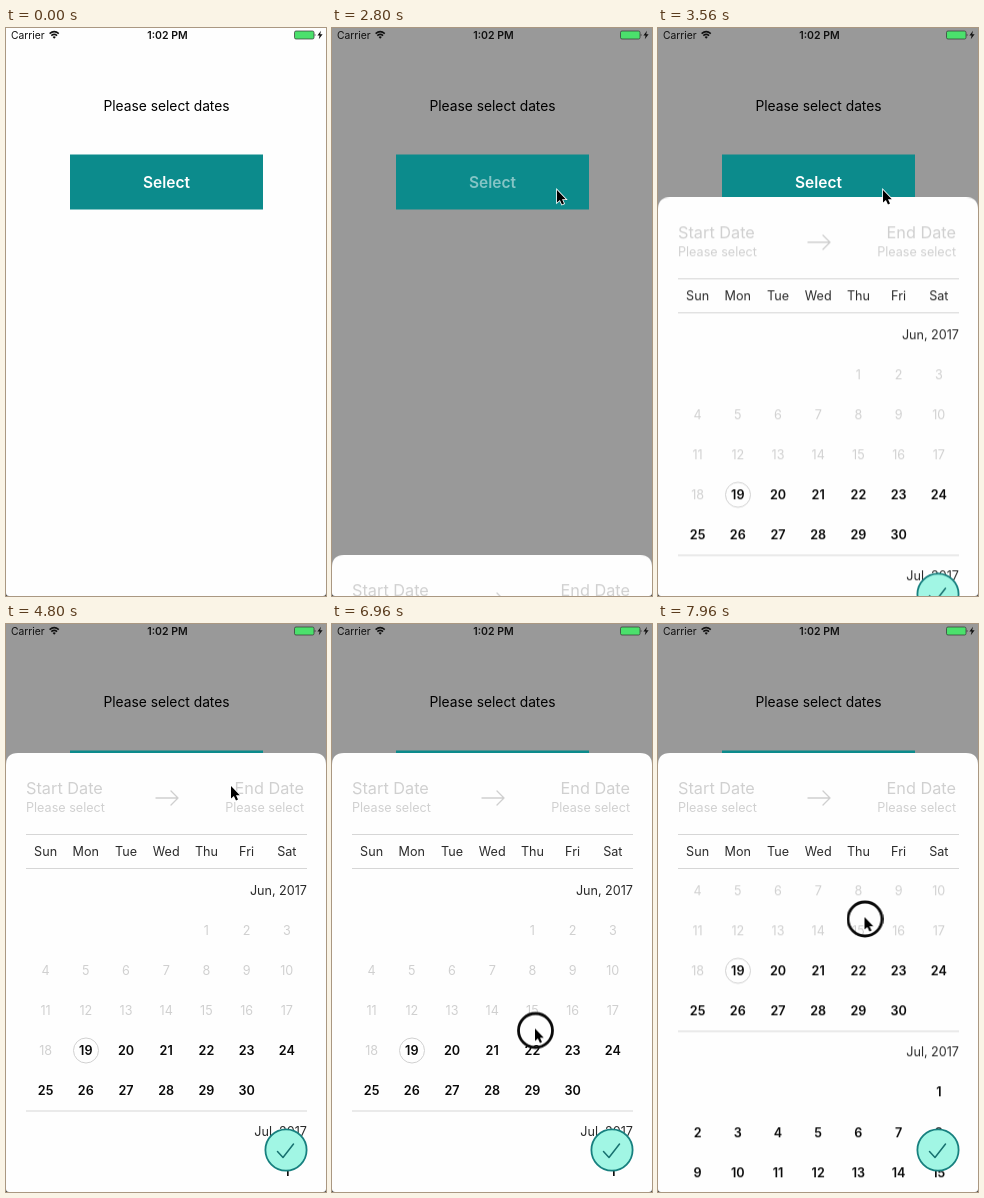
Recreate the animation shown at these times as an HTML page. Size 320 px wide and 568 px high, loop 8000 ms.

```html
<!DOCTYPE html>
<html lang="en">
<head>
<meta charset="utf-8">
<title>Date picker</title>
<style>
html, body { margin: 0; width: 100%; height: 100%; overflow: hidden; background: #fefefe; }
svg { display: block; width: 320px; height: 568px; font-family: Inter, Roboto, sans-serif; }
.end { text-anchor: end; }
.mid { text-anchor: middle; }
.semi { font-weight: 600; }
.pale { fill: #d0d0d0; }
.title { font-size: 16.3px; }
.hint { font-size: 12.6px; }
.cal { font-size: 12.6px; fill: #2b2b2b; }
.day { font-size: 12.6px; font-weight: 600; fill: #0a0a0a; }
.past { font-weight: 400; fill: #d0d0d0; }
.rule { stroke: #d6d6d6; }
.line { fill: none; stroke-linecap: round; stroke-linejoin: round; }

#dim, #label, #sheet, #scroll, #cursor, #ring { animation: 8s linear infinite; }
#dim { animation-name: dim; }
#label { animation-name: label; }
#sheet { animation-name: sheet; }
#scroll { animation-name: scroll; }
#cursor { animation-name: cursor; }
#ring { animation-name: ring; }

@keyframes dim {
  0%, 29% { opacity: 0; }
  34.5%, 100% { opacity: .4; }
}
@keyframes label {
  0%, 28% { opacity: 1; }
  29%, 37% { opacity: .5; }
  39%, 100% { opacity: 1; }
}
@keyframes sheet {
  0% { transform: translateY(439px); }
  31.49% { transform: translateY(439px); animation-timing-function: ease-in-out; }
  48.01%, 100% { transform: translateY(0); }
}
@keyframes scroll {
  0% { transform: translateY(0); }
  91% { transform: translateY(0); animation-timing-function: cubic-bezier(.4, 0, .8, .8); }
  99.5%, 100% { transform: translateY(-79.7px); }
}
@keyframes cursor {
  0%, .5% { transform: translate(324px, 288px); animation-timing-function: ease-out; }
  7.5% { transform: translate(245px, 173px); }
  15.5% { transform: translate(245px, 173px); animation-timing-function: ease-in-out; }
  21.5% { transform: translate(225px, 162px); }
  68.5% { transform: translate(225px, 162px); animation-timing-function: ease-in; }
  74% { transform: translate(254px, 255px); }
  79% { transform: translate(226px, 355px); animation-timing-function: ease-out; }
  86%, 89.5% { transform: translate(203px, 404.5px); animation-timing-function: cubic-bezier(.4, 0, .8, .8); }
  99.5%, 100% { transform: translate(206.5px, 293px); }
}
@keyframes ring {
  0%, 27.99% { opacity: 0; }
  28%, 29.99% { opacity: 1; }
  30%, 86.49% { opacity: 0; }
  86.5%, 100% { opacity: 1; }
}
</style>
</head>
<body>
<svg viewBox="0 0 320 568">
  <defs>
    <clipPath id="view"><rect y="245" width="320" height="323"/></clipPath>
  </defs>
  <rect width="320" height="568" fill="#fefefe"/>
  <rect id="dim" width="320" height="568"/>

  <g fill="#111">
    <text x="5" y="10.8" font-size="10.3">Carrier</text>
    <text x="161.5" y="10.8" font-size="10.5" class="mid semi">1:02 PM</text>
    <g class="line" stroke="#111" stroke-width="1.5" style="stroke-linecap: butt">
      <path d="M43.6 5.6Q48.2 1.6 52.8 5.6M45.3 7.6Q48.2 5.2 51.1 7.6"/>
    </g>
    <path d="M46.6 8.9Q48.2 7.8 49.8 8.9L48.2 10.7Z"/>
    <rect x="288.5" y="3" width="19.5" height="8" rx="1.5" fill="#4be06c" stroke="#333" stroke-width=".7"/>
    <path d="M308.8 5.5Q310.2 7 308.8 8.5Z"/>
    <path d="M315 2.8L311.4 7.5H313.6L312.8 11.2L316.6 6.2H314.2Z"/>
  </g>

  <text x="160.5" y="83.3" font-size="13.8" class="mid">Please select dates</text>
  <rect x="64" y="126.5" width="193" height="55" fill="#0c8b8c"/>
  <text id="label" x="160.5" y="159.6" font-size="15.5" fill="#fefefe" class="mid semi">Select</text>

  <g id="sheet">
    <path d="M0 568V141Q0 129 12 129H308Q320 129 320 141V568Z" fill="#fefefe"/>
    <g class="pale">
      <text x="20" y="170" class="title">Start Date</text>
      <text x="20" y="188" class="hint">Please select</text>
      <text x="298" y="170" class="title end">End Date</text>
      <text x="298" y="188" class="hint end">Please select</text>
    </g>
    <path d="M150 174H172M165 167L172 174L165 181" class="line" stroke="#cfcfcf" stroke-width="1.3"/>
    <path d="M20 210.5H301M20 244.5H301" class="rule"/>
    <g id="week"></g>
    <g clip-path="url(#view)">
      <g id="scroll">
        <text x="301" y="270.5" class="cal end">Jun, 2017</text>
        <circle cx="80" cy="426.5" r="12.5" fill="none" stroke="#d0d0d0"/>
        <path d="M20 487H301" class="rule"/>
        <text x="301" y="512" class="cal end">Jul, 2017</text>
      </g>
    </g>
    <circle cx="280" cy="526" r="20.6" fill="#a1f6e4" stroke="#17807f" stroke-width="1.8"/>
    <path d="M271.5 527.5L277 533.5L287.5 520" class="line" stroke="#17706f" stroke-width="1.5"/>
  </g>

  <path d="M0 565Q0 568 3 568H0ZM320 565Q320 568 317 568H320Z" fill="#444"/>

  <g id="cursor">
    <circle id="ring" cx=".5" cy="2" r="17" fill="none" stroke="#0a0a0a" stroke-width="2.8"/>
    <path d="M0 0V12.5L2.9 9.9L5 14.5L7 13.6L5 9.2H8.8Z" stroke="#fff" stroke-width="1.6" paint-order="stroke"/>
  </g>
</svg>
<script>
const NS = "http://www.w3.org/2000/svg";
const $ = id => document.getElementById(id);
const colX = col => 39.6 + col * 40.2;

function addText(parent, x, y, text, cls) {
  const el = document.createElementNS(NS, "text");
  el.setAttribute("x", x);
  el.setAttribute("y", y);
  el.setAttribute("class", "mid " + cls);
  el.textContent = text;
  parent.append(el);
}

function addMonth(firstCol, days, top, today) {
  for (let d = 1; d <= days; d++) {
    const cell = firstCol + d - 1;
    const y = top + Math.floor(cell / 7) * 40.2 + 4.6;
    addText($("scroll"), colX(cell % 7), y, d, d < today ? "day past" : "day");
  }
}

"Sun Mon Tue Wed Thu Fri Sat".split(" ")
  .forEach((name, i) => addText($("week"), colX(i), 232.3, name, "cal"));
addMonth(4, 30, 306, 19);
addMonth(6, 31, 547.8, 0);
</script>
</body>
</html>
```
